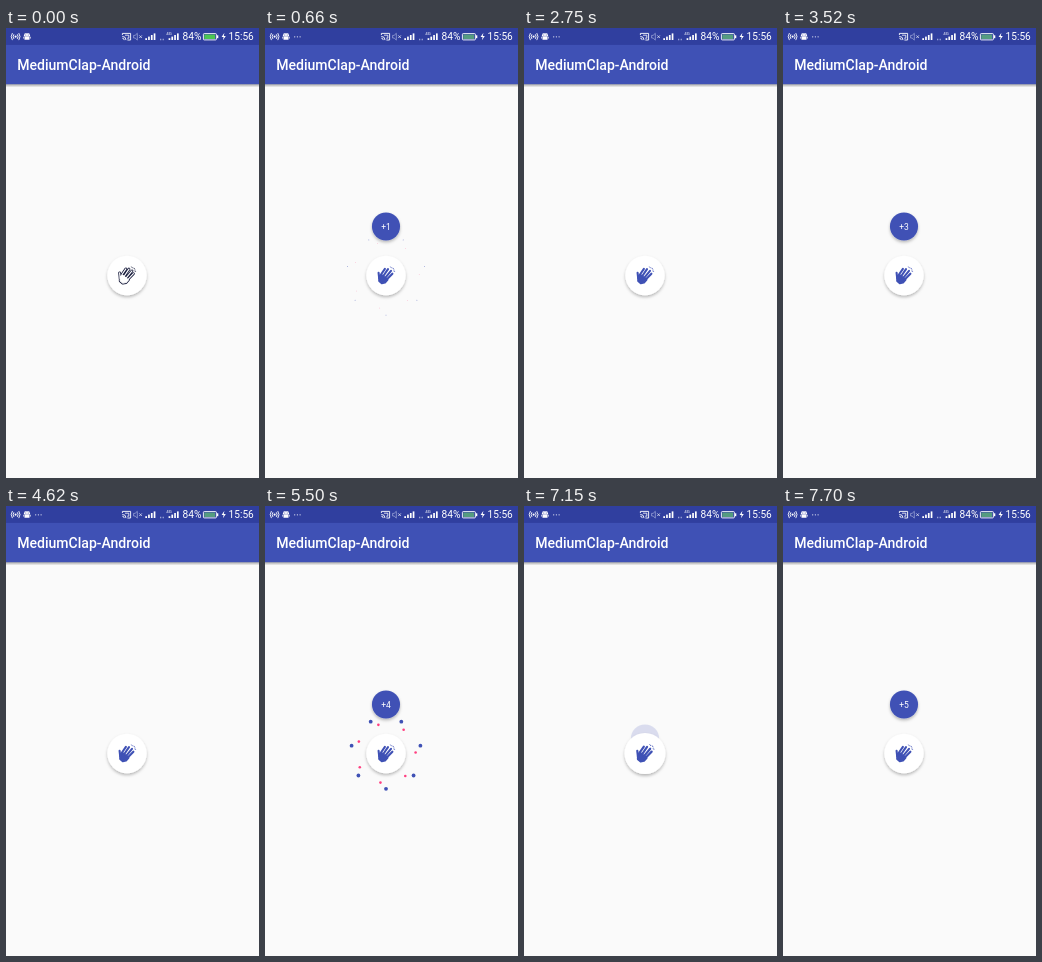
An HTML page for the animation above (8000 ms loop, 253 by 450 pixels).

```html
<!DOCTYPE html>
<html lang="en">
<head>
<meta charset="utf-8">
<title>Clap button</title>
<style>
  html, body { margin: 0; width: 100%; height: 100%; overflow: hidden; background: #fafafa; }
  svg { display: block; width: 100vw; height: 100vh; }
  text { font-family: Roboto, "Noto Sans", sans-serif; fill: #fff; }
</style>
</head>
<body>
<svg viewBox="0 0 253 450">
  <defs>
    <filter id="lift" x="-40%" y="-40%" width="180%" height="190%">
      <feDropShadow dx="0" dy="1.8" stdDeviation="1.7" flood-color="#000" flood-opacity=".27"/>
    </filter>
    <linearGradient id="barShade" x1="0" y1="0" x2="0" y2="1">
      <stop offset="0" stop-color="#000" stop-opacity=".34"/>
      <stop offset="1" stop-color="#000" stop-opacity="0"/>
    </linearGradient>
  </defs>

  <rect width="253" height="450" fill="#fafafa"/>
  <rect y="56" width="253" height="3.5" fill="url(#barShade)"/>
  <rect y="16" width="253" height="40.2" fill="#3f51b5"/>
  <rect width="253" height="16.9" fill="#303f9f"/>
  <text x="11.2" y="41.8" font-size="14.06" font-weight="500">MediumClap-Android</text>

  <!-- status bar, left -->
  <g fill="none" stroke="#fff" stroke-width=".9" stroke-linecap="round">
    <circle cx="9.6" cy="8.6" r="1.1" fill="#fff" stroke="none"/>
    <path d="M7.7 6.6q-1.4 2 0 4M11.5 6.6q1.4 2 0 4M6.2 5.4q-2.2 3.2 0 6.4M13 5.4q2.2 3.2 0 6.4"/>
  </g>
  <g fill="#fff">
    <path d="M17.8 8.2a3.2 3 0 0 1 6.4 0zM18.5 8.6h5v3.2h-5z"/>
    <path d="M18.8 5l1 1.3M23.2 5l-1 1.3M17.6 8.8v1.8M24.4 8.8v1.8" stroke="#fff" stroke-width=".7"/>
    <circle cx="19.8" cy="7.1" r=".5" fill="#303f9f"/>
    <circle cx="22.2" cy="7.1" r=".5" fill="#303f9f"/>
  </g>
  <g id="more" fill="#dfe2f3">
    <circle cx="29.7" cy="8.8" r=".65"/><circle cx="32.4" cy="8.8" r=".65"/><circle cx="35.1" cy="8.8" r=".65"/>
  </g>

  <!-- status bar, right -->
  <g fill="none" stroke="#fff" stroke-width=".9">
    <path d="M116.4 7V5.4h8.2v6.6h-3.2M116.3 8.4a3.7 3.7 0 0 1 3.7 3.7M116.3 10.2a1.9 1.9 0 0 1 1.9 1.9"/>
    <path d="M119 7.2h3.8v3h-1.6" stroke-width=".8"/>
  </g>
  <g fill="none" stroke="#9aa3d6" stroke-width=".8">
    <path d="M127.6 7.4h1.5l2.2-2.1v6.8l-2.2-2.1h-1.5z"/>
    <path d="M133.3 7.4l2.6 2.6M135.9 7.4l-2.6 2.6" stroke="#dfe2f3"/>
  </g>
  <g id="bars" fill="#fff"></g>
  <path d="M154 11.5h1.3M156.6 11.5h1.3" stroke="#9aa3d6" stroke-width="1.3"/>
  <text x="160.2" y="7.4" font-size="4.4">4G</text>
  <text x="176.6" y="12.3" font-size="10.2">84%</text>
  <rect x="197.4" y="5.6" width="13" height="6.3" rx=".8" fill="none" stroke="#fff" stroke-width=".9"/>
  <rect x="211" y="7.3" width="1.3" height="2.9" fill="#fff"/>
  <rect id="charge" x="198.3" y="6.5" width="10.8" height="4.5"/>
  <path d="M218.4 4.8l-2.8 4.2h2l-.7 3.3 2.9-4.4h-2z" fill="#fff"/>
  <text x="222.6" y="12.3" font-size="10.1">15:56</text>

  <!-- clap controls -->
  <g id="dots"></g>
  <g id="bubble">
    <circle r="14.05" fill="#3f51b5" filter="url(#lift)"/>
    <text id="count" y="3.1" font-size="8.5" text-anchor="middle"></text>
  </g>
  <g id="button">
    <circle r="19.7" fill="#fff" filter="url(#lift)"/>
    <g id="hand" stroke-linecap="round" stroke-linejoin="round"></g>
  </g>
</svg>
<script>
const LOOP = 8000, STEP = 110;
const CX = 121, BUTTON_Y = 247.5, BUBBLE_Y = 198.5;
const RISE = 300, HIDE = 390, BURST = 600, PULSE = 300;
const taps = [
  { at: 110 }, { at: 1870 }, { at: 2750, hide: 4230 },
  { at: 5170, hide: 6430 }, { at: 7100 }
];

const $ = id => document.getElementById(id);
const clamp = x => Math.max(0, Math.min(1, x));
const easeOut = x => 1 - (1 - x) ** 2;
const easeInOut = x => (1 - Math.cos(Math.PI * x)) / 2;
const place = (el, x, y, s = 1) =>
  el.setAttribute("transform", `translate(${x} ${y}) scale(${s})`);

function add(parent, tag, attrs) {
  const el = document.createElementNS("http://www.w3.org/2000/svg", tag);
  for (const k in attrs) el.setAttribute(k, attrs[k]);
  parent.append(el);
  return el;
}

function signal(x) {
  for (let i = 0; i < 4; i++) {
    const h = 1.8 + i * 1.6;
    add($("bars"), "rect", { x: x + i * 2.8, y: 12 - h, width: 1.7, height: h });
  }
}
signal(139.3);
signal(162.6);

const fingers = "M-5-1L-1.1-6.6M-3 1L2-6.4M-1 2.6L5-4.6M0 4.8L6.4-1.8M-6.8 3L-7.4-2.6";
const palm = "M-6.6 1L-4.4-.4L1.4 4.4L-1 7L-4.2 7.6L-6.8 5.4Z";
const ticks = "M4.6-8.6l.8 1M7-7.4l.7 1.1M7.8-4.5l.9.3";

function makeHand(filled) {
  const g = add($("hand"), "g", {});
  const ink = filled ? "#3f51b5" : "#171b3c";
  const layer = (color, width) => {
    add(g, "path", { d: fingers, fill: "none", stroke: color, "stroke-width": width });
    add(g, "path", { d: palm, fill: color, stroke: color, "stroke-width": width });
  };
  layer(ink, filled ? 2.1 : 2.8);
  if (!filled) layer("#fff", 1.2);
  add(g, "path", { d: ticks, fill: "none", stroke: ink, "stroke-width": .8 });
  return g;
}
const outlineHand = makeHand(false), filledHand = makeHand(true);

const dots = [];
for (let i = 0; i < 14; i++) {
  dots.push(add($("dots"), "circle", { fill: i % 2 ? "#ff4081" : "#3f51b5" }));
}

function drawBurst(p) {
  const visible = p > 0 && p < 1;
  $("dots").style.display = visible ? "" : "none";
  if (!visible) return;
  const spread = p < .3 ? p / .3 * .8 : .8 + (p - .3) / .7 * .2;
  const size = p < .6 ? 1 : (1 - p) / .4;
  dots.forEach((dot, i) => {
    const inner = i % 2;
    const angle = (Math.floor(i / 2) / 7 + inner * .03) * 2 * Math.PI + Math.PI / 2;
    const r = spread * (inner ? 34 : 40.5);
    dot.setAttribute("cx", CX + r * Math.cos(angle));
    dot.setAttribute("cy", BUTTON_Y + r * Math.sin(angle));
    dot.setAttribute("r", size * (inner ? 1.3 : 1.9));
  });
}

function drawBubble(tap, n, t) {
  const rise = tap ? clamp((t - tap.at) / RISE) : 0;
  const hide = tap && tap.hide ? clamp((t - tap.hide) / HIDE) : 0;
  const out = easeInOut(hide);
  const y = BUTTON_Y + (BUBBLE_Y - BUTTON_Y) * easeOut(rise) - 20 * out;
  place($("bubble"), CX, y);
  $("bubble").style.opacity = rise * (1 - out);
  $("count").textContent = "+" + n;
}

function draw(time) {
  const t = Math.floor(time % LOOP / STEP) * STEP;
  const n = taps.filter(tap => tap.at <= t).length;
  const tap = taps[n - 1];
  const age = tap ? t - tap.at : Infinity;

  $("more").style.display = n ? "" : "none";
  $("charge").setAttribute("fill", n ? "#559c80" : "#4bc653");
  outlineHand.style.display = n ? "none" : "";
  filledHand.style.display = n ? "" : "none";

  place($("button"), CX, BUTTON_Y, 1 + .08 * Math.sin(Math.PI * clamp(age / PULSE)));
  drawBubble(tap, n, t);
  drawBurst(clamp(age / BURST));
}

const start = performance.now();
function tick() {
  draw(performance.now() - start);
  requestAnimationFrame(tick);
}
tick();
</script>
</body>
</html>
```
